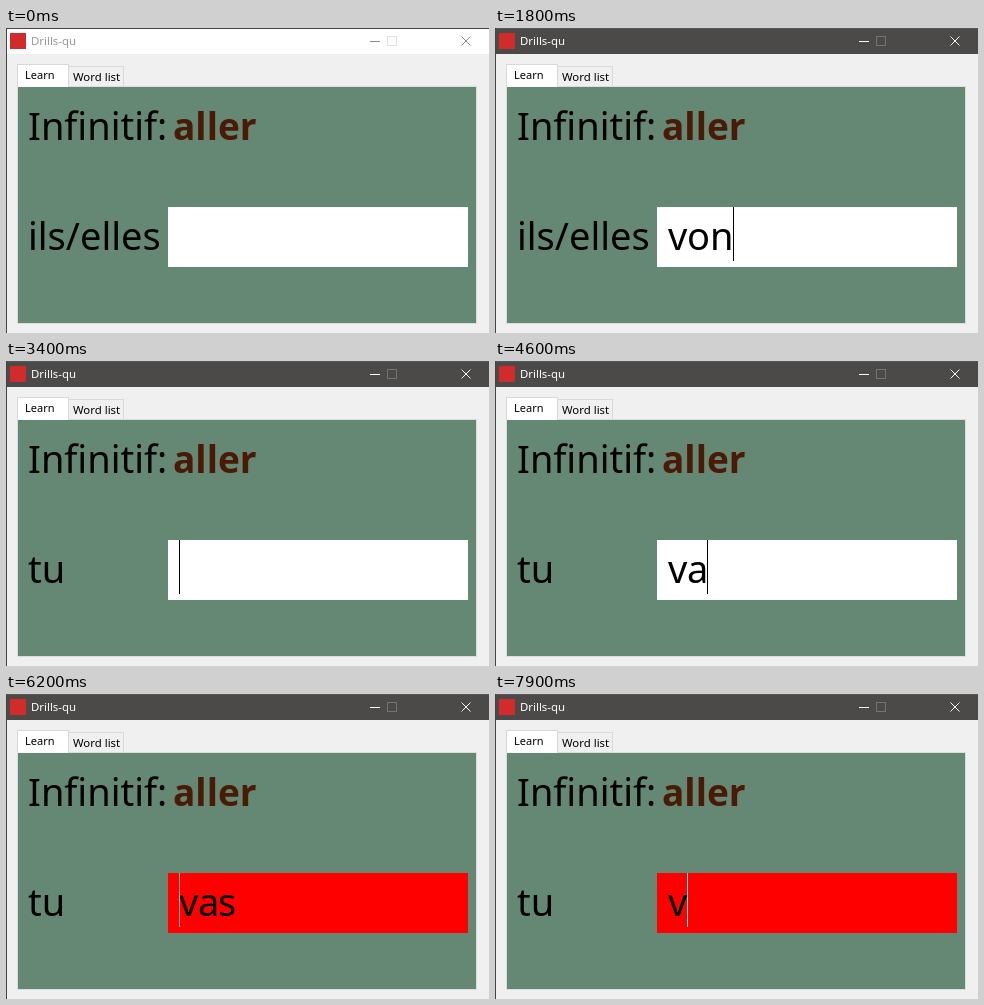
These frames come from a looping animation (483x305 px, 8000 ms). An HTML page:

```html
<!DOCTYPE html>
<html lang="fr">
<head>
<meta charset="utf-8">
<title>Drills-qu</title>
<style>
html, body { margin: 0; width: 100%; height: 100%; overflow: hidden; background: #f0f0f0; }
svg { display: block; width: 483px; height: 305px; font-family: "Noto Sans", "Open Sans", sans-serif; }
rect, .crisp { shape-rendering: crispEdges; }
text { white-space: pre; }
.big { font-size: 38px; }
.small { font-size: 11.4px; }
</style>
</head>
<body>
<svg viewBox="0 0 483 305">
  <rect width="483" height="305" fill="#f0f0f0"/>
  <rect id="bar" width="483" height="26"/>
  <rect id="edge" width="483" height="1"/>
  <rect width="1" height="305" fill="#45443f"/>
  <rect x="4" y="5" width="16" height="16" fill="#d12b2b"/>
  <text id="title" class="small" x="25" y="17">Drills-qu</text>
  <g id="buttons" fill="none">
    <path class="crisp" d="M364 13.5h10"/>
    <path d="M455.5 8.5l9 9M464.5 8.5l-9 9"/>
  </g>
  <rect id="max" x="381.5" y="8.5" width="9" height="9" fill="none"/>

  <rect x="62.5" y="38.5" width="55" height="20" fill="#f0f0f0" stroke="#d9d9d9"/>
  <rect x="11.5" y="58.5" width="459" height="237" fill="#648873" stroke="#dcdcdc"/>
  <rect x="11.5" y="36.5" width="51" height="22" fill="#fff" stroke="#d9d9d9"/>
  <rect x="12" y="57" width="50" height="2" fill="#fff"/>
  <text x="19" y="51" font-size="11">Learn</text>
  <text class="small" x="67" y="53">Word list</text>

  <g id="labels" class="big">
    <text x="22" y="112">Infinitif:</text>
    <text x="167" y="112" font-size="37" font-weight="700" fill="#4b1a06">aller</text>
    <text id="pronoun" x="22" y="222"></text>
  </g>
  <rect id="field" x="162" y="179" width="300" height="60"/>
  <rect id="mark" x="173" y="179" width="56" height="54" fill="#0078d7"/>
  <text id="entry" class="big" y="222"></text>
  <rect id="caret" y="179" width="1" height="54"/>
</svg>
<script>
const $ = id => document.getElementById(id);
const LOOP = 8000;
const ADVANCE = { v: 19, o: 23, n: 23, t: 14, a: 20, s: 17 };

// [start, typed text, caret index or -1 when hidden]
const steps = [
  [0, "", -1], [500, "", 0], [1000, "", -1],
  [1400, "v", 1], [1600, "vo", 2], [1800, "von", 3], [2100, "vont", 4],
  [2400, "", 0], [2900, "", -1], [3400, "", 0], [3900, "", -1],
  [4400, "v", 1], [4600, "va", 2], [5100, "va", -1], [5600, "va", 2], [6000, "va", -1],
  [6200, "vas", 0], [6700, "vas", -1], [7100, "vas", 0],
  [7500, "vas", 3], [7900, "v", 1]
];

function set(id, attrs) {
  for (const name in attrs) $(id).setAttribute(name, attrs[name]);
}

function offsets(word) {
  const xs = [173];
  for (const c of word) xs.push(xs[xs.length - 1] + ADVANCE[c]);
  return xs;
}

function render(t) {
  const active = t >= 500;
  const wrong = t >= 6200;
  const selected = t >= 7500 && t < 7900;

  set("bar", { fill: active ? "#4b4a48" : "#fff" });
  set("edge", { fill: active ? "#595856" : "#45443f" });
  set("title", { fill: active ? "#fff" : "#999" });
  set("buttons", { stroke: active ? "#fff" : "#8c8c8c" });
  set("max", { stroke: active ? "#747371" : "#e2e2e2" });

  set("labels", { visibility: t >= 2400 && t < 2500 ? "hidden" : "visible" });
  $("pronoun").textContent = t < 2400 ? "ils/elles" : "tu";

  const [, word, at] = steps.filter(s => s[0] <= t).pop();
  const xs = offsets(word);
  set("field", { fill: wrong ? "#f00" : "#fff" });
  set("mark", { visibility: selected ? "visible" : "hidden" });
  set("entry", { x: xs.slice(0, word.length || 1).join(" "), fill: selected ? "#fff" : "#000" });
  $("entry").textContent = word;
  set("caret", {
    x: xs[Math.max(at, 0)],
    visibility: at < 0 ? "hidden" : "visible",
    fill: !wrong ? "#000" : t < 7500 ? "#c0a8a0" : "#0ff"
  });
}

const begin = performance.now();
function tick() {
  render((performance.now() - begin) % LOOP);
  requestAnimationFrame(tick);
}
tick();
</script>
</body>
</html>
```
